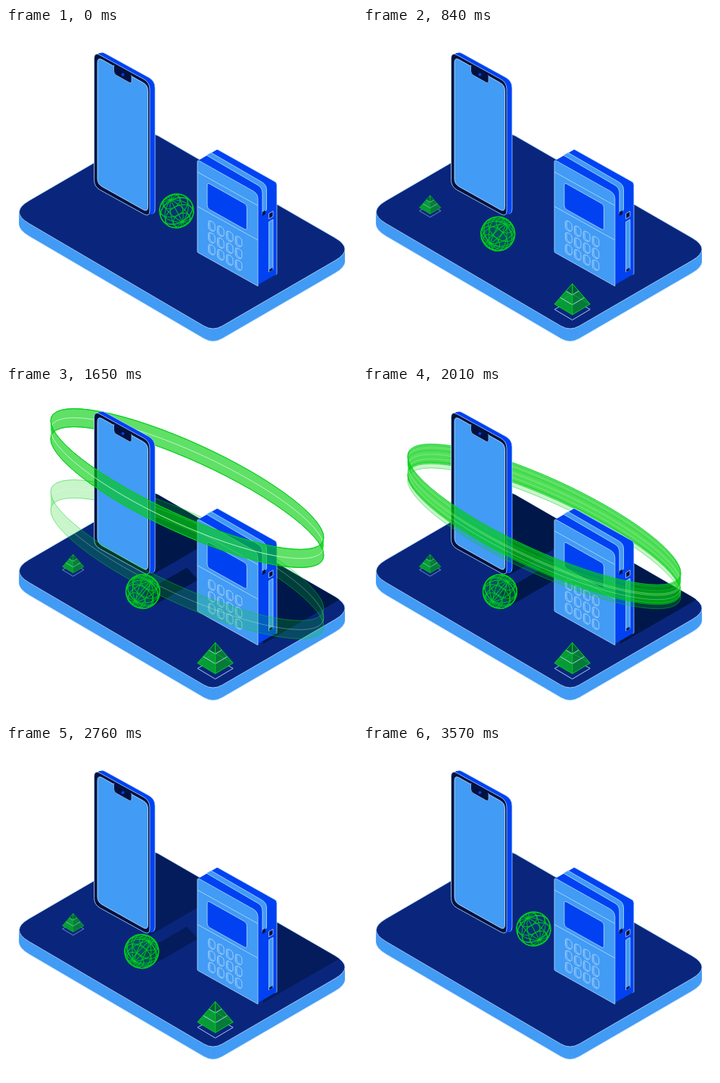
Recreate the animation shown at these times as an HTML page with a canvas. Size 464x437 px, loop 3660 ms.

```html
<!DOCTYPE html>
<html lang="en">
<head>
<meta charset="utf-8">
<title>Isometric payment scene</title>
<style>
  html, body { margin: 0; width: 100%; height: 100%; overflow: hidden; background: #fff; }
  canvas { display: block; width: 464px; height: 437px; }
</style>
</head>
<body>
<canvas id="stage" width="464" height="437"></canvas>
<script>
const ctx = document.getElementById('stage').getContext('2d');
const LOOP = 3660, TAU = Math.PI * 2, ISO = 0.577;
const NAVY = '#0a267c', SKY = '#429bf4', BLUE = '#0042f2', INK = '#00113f';
const LINE = '#b4dafd', GREEN = '#00cf1c', SHADE = '#00174a';

const mix = (a, b, k) => a + (b - a) * k;
const ease = k => (1 - Math.cos(Math.PI * Math.min(1, Math.max(0, k)))) / 2;
const ramp = (t, from, to) => ease((t - from) / (to - from));
const pulse = (t, in0, in1, out0, out1) => ramp(t, in0, in1) - ramp(t, out0, out1);

function paint(fill, stroke, width = 0.8) {
  if (fill) { ctx.fillStyle = fill; ctx.fill(); }
  if (stroke) { ctx.strokeStyle = stroke; ctx.lineWidth = width; ctx.stroke(); }
}

// Closed polygon; radius is one number or a repeating pattern of corner radii.
function trace(pts, radius = 0) {
  const n = pts.length, radii = [].concat(radius);
  const toward = (p, q, r) => {
    const k = Math.min(0.5, r / Math.hypot(q[0] - p[0], q[1] - p[1]));
    return [mix(p[0], q[0], k), mix(p[1], q[1], k)];
  };
  ctx.beginPath();
  pts.forEach((p, i) => {
    const r = radii[i % radii.length];
    ctx.lineTo(...toward(p, pts[(i + n - 1) % n], r));
    ctx.quadraticCurveTo(...p, ...toward(p, pts[(i + 1) % n], r));
  });
  ctx.closePath();
}
function poly(pts, fill, stroke, radius, width) {
  trace(pts, radius);
  paint(fill, stroke, width);
}
function line(pts, color, width = 0.8) {
  ctx.beginPath();
  pts.forEach(p => ctx.lineTo(...p));
  paint(null, color, width);
}
// Upright parallelogram whose top edge follows the slope.
const panel = (x, y, w, h, slope = 0.56) =>
  [[x, y], [x + w, y + w * slope], [x + w, y + w * slope + h], [x, y + h]];

// Solid swept from the given outline by (dx, dy), drawn from the far end.
function extrude(pts, dx, dy, fill, radius) {
  const steps = Math.ceil(Math.hypot(dx, dy));
  for (let i = steps; i > 0; i--) {
    const k = i / steps;
    poly(pts.map(([x, y]) => [x + dx * k, y + dy * k]), fill, i === steps && LINE, radius);
  }
}

const TOP = [[4.5, 243], [189.5, 135.6], [461, 292], [273.7, 400.5]];
const CORNERS = [30, 14];

// Parallelogram of shade running back along the floor from edge p-q.
const cast = (p, q, length) => poly(
  [p, q, [q[0] + length, q[1] - length * ISO], [p[0] + length, p[1] - length * ISO]], SHADE);

function platform(shadow) {
  extrude(TOP, 0, 16.5, SKY, CORNERS);
  poly(TOP, NAVY, LINE, CORNERS);
  ctx.save();
  trace(TOP, CORNERS);
  ctx.clip();
  ctx.globalAlpha = shadow;
  cast([117, 186], [190, 250], 140);
  cast([181, 272], [196, 288], 58);
  cast([333, 219], [340, 339], 100);
  ctx.restore();
}

function phone() {
  const front = panel(116.5, 31.5, 73.5, 178, 0.55);
  extrude(front, 7, -2, BLUE, 9);
  poly(front, INK, LINE, 9);
  poly(panel(121, 38.5, 66.5, 167.5), SKY, LINE, 7, 0.9);
  poly(panel(142.5, 49.5, 23.5, 11), INK, LINE, [0, 0, 4, 4], 0.6);
  line([[143.5, 49.5], [165.5, 62]], INK, 2.5);
  ctx.beginPath();
  ctx.arc(154.5, 61.5, 2, 0, TAU);
  paint(BLUE);
}

function terminal() {
  const front = panel(253, 174, 80, 122);
  extrude(front, 25, -14.5, BLUE, 3);
  poly([[265, 168], [271, 164.5], [344.5, 207], [344.5, 240], [339, 246], [339, 211]],
    SKY, LINE, [1, 1, 7]);
  poly(front, SKY, LINE, [3, 7, 0, 1]);
  for (const y of [190, 235.5]) line([[253, y], [333, y + 44.5]], LINE);
  poly(panel(266, 204, 52.5, 34), BLUE, LINE, 4);
  poly(panel(339, 243, 4, 5, -ISO), INK);
  poly(panel(347.5, 245, 5.5, 7, -ISO), INK, LINE);
  poly(panel(347.5, 256, 5.5, 66, -ISO), SKY, LINE);
  poly(panel(348, 319, 4.5, 3, -ISO), INK);
  for (let row = 0; row < 3; row++) {
    for (let col = 0; col < 4; col++) {
      const x = 267.5 + col * 11.9, y = 253.5 + row * 15.6 + col * 6.8;
      poly(panel(x, y, 7.5, 12), SKY, LINE, 3);
      poly(panel(x + 1.7, y + 0.4, 7, 11), SKY, LINE, 3);
    }
  }
}

function pyramid(x, y, size, shown) {
  if (shown <= 0) return;
  const apex = [0, 0], left = [-23.5, 27], right = [23.5, 27], front = [0, 41], back = [0, 14];
  const at = (p, k) => [p[0] * k, p[1] * k];
  ctx.save();
  ctx.translate(x, y);
  ctx.scale(size, size);
  ctx.globalAlpha = shown;
  poly([left, back, right, front].map(p => [p[0], p[1] + 7]), null, LINE, 0, 0.9);
  ctx.translate(0, -12 * (1 - shown));
  poly([apex, left, front], '#079b35');
  poly([apex, front, right], '#067a38');
  poly([apex, at(left, 0.36), at(front, 0.36), at(right, 0.36)], '#045a3c');
  line([left, back, right], '#10b53a', 0.7);
  line([apex, back], '#10b53a', 0.7);
  for (const k of [0.36, 0.68]) line([left, front, right].map(p => at(p, k)), LINE, 0.9);
  line([apex, front], GREEN, 1);
  poly([apex, left, front, right], null, GREEN, 0, 1);
  ctx.restore();
}

// One half of a tilted hoop: sheared unit circle extruded downward.
function hoop(cy, front, alpha) {
  const from = front ? 0 : Math.PI, to = from + Math.PI, height = 24;
  const arc = (drop, a, b, reverse) => {
    ctx.save();
    ctx.transform(180.5, 77, 0, 52, 239.5, cy + drop);
    ctx.arc(0, 0, 1, a, b, reverse);
    ctx.restore();
  };
  ctx.globalAlpha = alpha;
  ctx.beginPath();
  arc(0, from, to, false);
  arc(height, to, from, true);
  ctx.closePath();
  paint('rgba(0,206,10,.44)');
  for (const k of [0, 0.5, 1]) {
    ctx.beginPath();
    arc(height * k, from, to, false);
    paint(null, k === 0.5 ? 'rgba(225,255,230,.65)' : GREEN, 1);
  }
  ctx.globalAlpha = 1;
}

function globe(x, y, spin, glow) {
  const R = 22.5, tilt = 0.75;
  const spot = (lat, lon) => {
    const px = Math.cos(lat) * Math.sin(lon), py = Math.sin(lat), pz = Math.cos(lat) * Math.cos(lon);
    return [R * px, R * (py * Math.cos(tilt) - pz * Math.sin(tilt))];
  };
  const curve = at => line(Array.from({ length: 41 }, (_, i) => at(i / 40 * TAU)), GREEN, 1);
  ctx.save();
  ctx.translate(x, y);
  ctx.rotate(spin / 2 - 0.5);
  ctx.beginPath();
  ctx.arc(0, 0, R, 0, TAU);
  paint(`rgba(0,150,50,${mix(0.12, 0.4, glow)})`, GREEN, 1.3);
  ctx.globalAlpha = 0.85;
  for (let i = -2; i <= 2; i++) curve(a => spot(i * 0.5, a));
  for (let i = 0; i < 6; i++) curve(a => spot(a, i * Math.PI / 6 + spin));
  ctx.restore();
}

// Hoops start bunched, then spread apart twice; -1 rises, 1 sinks.
const HOOPS = [
  { first: -1, start: 1110, second: -1, restart: 1990 },
  { first: -1, start: 1220, second: 1, restart: 1960 },
  { first: 1, start: 1090, second: 1, restart: 1900 }
];
const hoopY = (t, h) => 168.5 + 47 * (
  h.first * pulse(t, h.start, h.start + 430, 1690, h.restart) +
  h.second * pulse(t, h.restart, h.restart + 430, 2480, 2780));

function draw(t) {
  const shown = pulse(t, 880, 1130, 2540, 2745);
  const hoops = front => shown > 0 &&
    HOOPS.forEach((h, i) => hoop(hoopY(t, h), front, shown * (1 - i * 0.26)));
  const travel = pulse(t, 120, 700, 2960, 3570) +
    0.08 * (pulse(t, 400, 700, 700, 1120) + pulse(t, 2580, 2960, 2960, 3200));

  ctx.clearRect(0, 0, 464, 437);
  platform(pulse(t, 850, 1150, 2620, 2960));
  hoops(false);
  phone();
  terminal();
  hoops(true);
  pyramid(88.7, 221, 0.6, pulse(t, 270, 630, 2880, 3340));
  pyramid(276.7, 337.5, 1, pulse(t, 120, 500, 3060, 3560));
  globe(mix(225.5, 181, travel), mix(241.5, 270, travel), travel * 2.2, Math.min(1, travel));
}

function frame() {
  draw(performance.now() % LOOP);
  requestAnimationFrame(frame);
}
frame();
</script>
</body>
</html>
```
